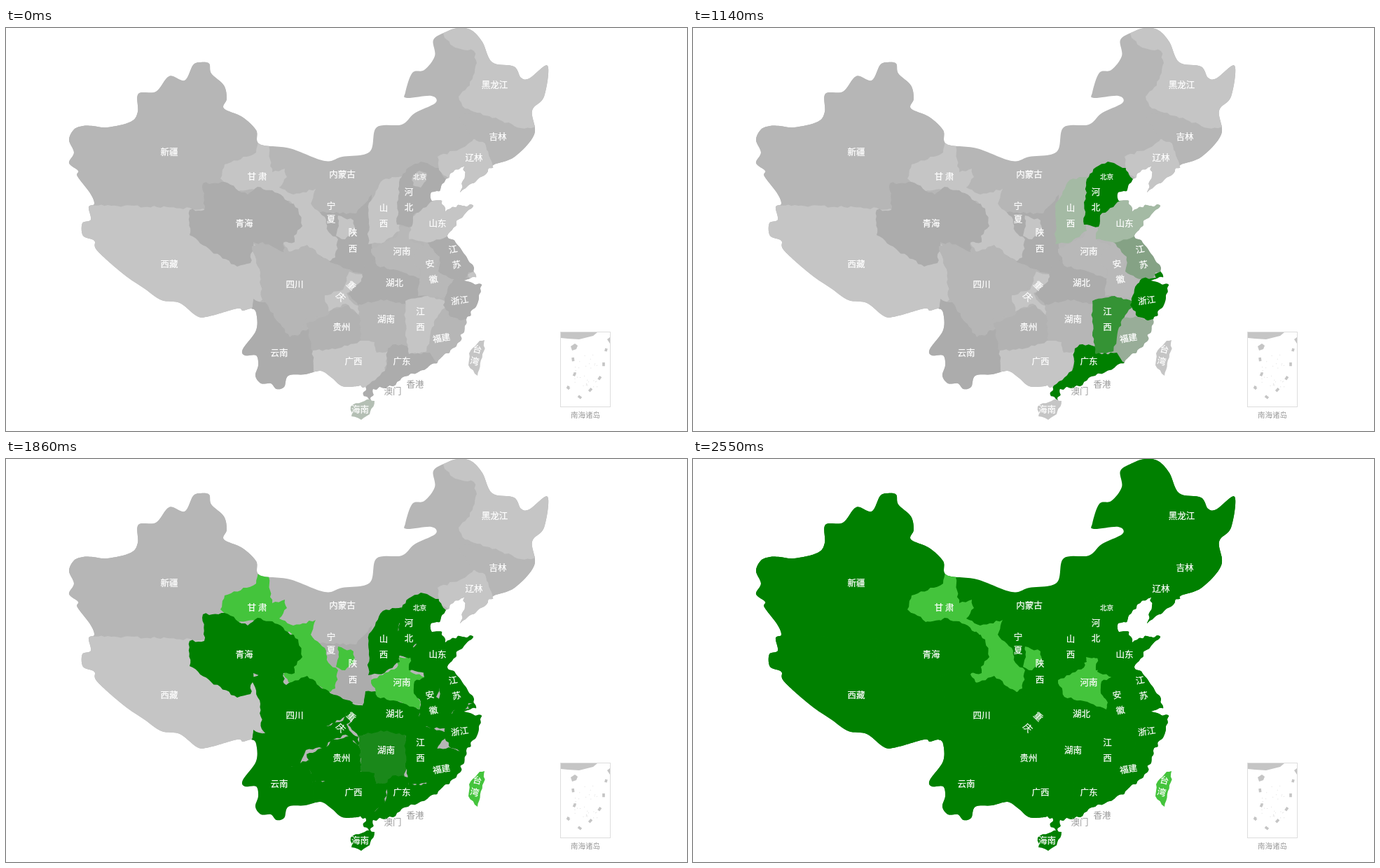
Write an HTML page that moves like this. It is 972 px wide and 576 px high and loops after 7.5 s.

```html
<!DOCTYPE html>
<html lang="zh-CN">
<head>
<meta charset="utf-8">
<style>
html, body { margin: 0; width: 100%; height: 100%; overflow: hidden; background: #fff; }
svg { display: block; width: 972px; height: 576px; }
text { font: 500 12.5px "Noto Sans CJK SC", "Noto Sans CJK", sans-serif; text-anchor: middle; }
#labels { fill: #fff; stroke: #fff; stroke-width: .25px; }
#captions { fill: #999; }
</style>
</head>
<body>
<svg viewBox="0 0 972 576">
  <clipPath id="border"></clipPath>
  <g id="mainland" clip-path="url(#border)"></g>
  <g id="islands"></g>
  <g id="inset" fill="#c5c5c5">
    <rect x="791.5" y="434.5" width="71" height="107" fill="#fff" stroke="#ddd"/>
    <path d="M792 435H844L838 440 818 445 802 444 792 443ZM806 455L812 451 816 454 814 459 808 461ZM858 445L862 442V451Z"/>
    <path d="M809 471L812 494 802 514 822 530 840 511 853 492V473L857 458" fill="none" stroke="#c5c5c5" stroke-width="3.6" pathLength="7.2" stroke-dasharray=".25 .75"/>
  </g>
  <g id="labels"></g>
  <g id="captions"></g>
</svg>
<script>
const LOOP = 7500, STEP = 30, FADE = 240;
const LIGHT = 197, MID = 182, DARK = 172;
const GREEN = [0, 128, 0], BRIGHT = [68, 196, 60];
const provinces = [];

let seed = 7;
const random = () => (seed = seed * 16807 % 2147483647) / 2147483647;
const parse = text => text.split(' ').map(pair => pair.split(',').map(Number));
const mix = (from, to, amount) => from.map((v, i) => v + (to[i] - v) * amount);

function add(parent, tag, attributes) {
  const node = document.createElementNS('http://www.w3.org/2000/svg', tag);
  for (const key in attributes) node.setAttribute(key, attributes[key]);
  return document.getElementById(parent).appendChild(node);
}

// Splits each edge into short pieces and shifts their ends sideways.
function roughen(points, amount) {
  return points.slice(0, -1).flatMap((a, i) => {
    const b = points[i + 1], dx = b[0] - a[0], dy = b[1] - a[1];
    const length = Math.hypot(dx, dy), pieces = Math.ceil(length / 5);
    return Array.from({ length: pieces }, (_, k) => {
      const [x, y] = mix(a, b, k / pieces), shift = k ? (random() * 2 - 1) * amount / length : 0;
      return [x - dy * shift, y + dx * shift];
    });
  });
}

// Closed Catmull-Rom curve through the points.
function curve(p) {
  const n = p.length;
  return 'M' + p[0] + p.map((a, i) => {
    const [b, c, d] = [1, 2, 3].map(k => p[(i + k) % n]);
    const near = b.map((v, k) => v + (c[k] - a[k]) / 6);
    const far = c.map((v, k) => v - (d[k] - b[k]) / 6);
    return i < n - 1 ? `C${near} ${far} ${c}` : `C${near} ${far} ${c}Z`;
  }).join('').replace(/^/, '').replace('M' + p[0], 'M' + p[0]);
}
const closedCurve = p => curve([p[p.length - 1], ...p.slice(0, -1)]).replace(/^M[^C]*/, 'M' + p[0]);

const north = parse('126,251 120,236 102,212 103,204 90,193 97,178 90,160 97,145 110,140 124,140 145,142 178,134 188,120 189,94 214,91 233,69 255,75 267,53 278,49 290,51 293,65 311,82 315,101 311,115 337,127 357,146 362,166 405,172 455,190 480,184 519,177 529,142 565,138 583,122 613,107 607,97 572,100 570,92 580,64 597,60 612,40 610,17 627,6 645,0 664,3 680,20 694,49 725,55 735,71 747,72 773,54 768,98 751,118 754,152 726,184');
const coast = parse('697,195 680,212 648,235 655,210 654,198 638,206 628,216 619,233 607,235 608,247 622,247 627,262 645,253 667,254 647,273 630,297 642,307 668,343 671,356 654,361 679,367 672,396 657,417 648,448 615,479 569,498 552,512 524,516 521,533 511,526 513,513 498,512');
const south = parse('480,512 465,500 449,490 427,495 403,497 397,513 386,516 378,508 364,508 356,497 360,482 357,468 341,468 338,459 357,432 357,407 350,401 338,404 330,401 290,412 273,412 248,393 222,389 197,372 168,352 130,318 126,304 110,297 109,279 121,274 118,256');
add('border', 'path', { d: closedCurve([...north, ...roughen(coast, 2), ...south]) });

function province(grey, start, points, options = {}) {
  const corners = parse(points);
  const d = 'M' + roughen([...corners, corners[0]], 1.6).join('L') + 'Z';
  provinces.push({ grey, start, color: GREEN, ...options, node: add(options.parent || 'mainland', 'path', { d }) });
}

// Painted in order over the northern base; shapes run past the coast and are clipped.
province(MID, 2010, '0,-20 972,-20 972,576 0,576');
province(MID, 1980, '80,40 360,40 362,166 340,200 284,262 230,256 126,251 80,251');
province(LIGHT, 1880, '80,253 150,254 230,256 290,260 356,310 364,350 366,388 357,400 340,430 80,430');
province(DARK, 1880, '448,263 500,265 522,238 522,308 527,332 515,335 510,352 488,346 450,330');
province(LIGHT, 1610, '362,160 373,160 377,188 380,206 398,201 401,213 390,228 410,238 442,230 435,251 455,270 460,291 474,302 470,328 459,333 441,320 407,321 396,308 420,280 408,250 360,230 330,234 306,215 312,195 357,178', { color: BRIGHT });
province(LIGHT, 1610, '474,268 496,275 498,287 484,302 471,297 475,283', { color: BRIGHT });
province(DARK, 1500, '281,222 312,220 345,238 359,227 388,236 417,258 423,283 411,297 412,306 396,306 397,322 366,310 353,306 349,336 330,341 293,319 262,296 262,260 283,260');
province(DARK, 1384, '353,387 375,394 407,440 432,430 437,461 449,480 449,500 400,530 320,510 320,450 350,402');
province(MID, 1290, '351,312 366,306 400,323 430,310 463,335 495,348 484,368 457,382 462,402 457,412 428,416 420,437 405,442 388,420 365,386 363,350');
province(MID - 4, 1470, '464,402 490,396 506,415 507,445 500,455 470,461 437,462 429,422 458,411');
province(DARK, 1600, '509,352 513,332 526,332 553,343 592,358 590,372 602,384 568,396 535,390 503,397 488,380');
province(MID, 1654, '503,395 535,388 570,394 574,420 569,455 545,464 530,465 524,450 507,447');
province(LIGHT, 1600, '490,348 508,352 507,362 486,379 490,388 503,397 503,410 485,394 460,405 455,382 481,374');
province(LIGHT, 1260, '438,461 470,459 510,447 526,449 529,464 545,462 541,490 517,514 500,530 440,510');
province(LIGHT, 965, '570,390 602,383 631,392 615,415 602,462 575,467 570,440');
province(MID + 2, 1610, '561,283 582,285 577,304 598,312 583,332 592,348 590,358 553,345 530,340 521,316 558,298', { color: BRIGHT });
province(MID + 2, 1444, '583,318 597,312 597,302 614,315 619,327 614,340 640,358 628,385 588,383 592,347 582,335');
province(DARK, 1085, '597,301 632,290 690,320 690,350 660,349 655,358 640,359 617,348 619,327');
province(LIGHT, 1100, '588,262 604,240 690,240 690,270 632,296 606,306 575,302 580,270');
province(LIGHT, 1100, '538,217 565,212 560,240 562,290 540,306 517,309 518,250');
province(DARK, 484, '562,216 575,199 592,191 618,200 628,216 630,240 610,247 581,268 579,284 558,281 560,240');
province(LIGHT - 6, 545, '580,213 590,204 600,207 600,218 592,228 581,225');
province(DARK, 720, '634,366 641,358 700,358 700,410 657,420 635,413 624,396');
province(LIGHT, 545, '659,352 680,345 680,358 664,361');
province(MID, 1100, '615,414 632,412 645,417 680,415 650,480 612,485 600,465 608,428');
province(DARK, 200, '545,458 556,452 573,455 575,466 605,464 620,484 560,530 521,545 505,530 515,511 541,490');
province(LIGHT, 2140, '616,184 652,171 668,158 684,165 695,197 710,220 640,250 632,216 618,203');
province(MID, 2048, '642,121 690,122 722,134 770,138 770,170 697,200 684,165 664,156');
province(LIGHT, 1935, '626,14 620,-10 800,-10 800,138 735,143 690,126 655,115 646,98 662,82 672,50 668,33 641,28', { color: BRIGHT, darken: 2310 });
province(LIGHT, 1250, '492,541 515,531 526,533 519,552 507,560 493,555', { parent: 'islands', tint: .085 });
province(LIGHT, 1320, '676,447 683,446 682,462 673,497 660,482 661,465', { parent: 'islands', color: BRIGHT });

function label(text, x, y, angle = 0, size = 12.5, parent = 'labels') {
  add(parent, 'text', { x, y: y + size * .38, transform: `rotate(${angle} ${x} ${y})`, style: `font-size:${size}px` }).textContent = text;
}
function column(text, x, y, dx, dy, angle) {
  [...text].forEach((character, i) => label(character, x + i * dx, y + i * dy, angle));
}
label('新疆', 233, 177);
label('西藏', 233, 337);
label('青海', 340, 279);
label('甘 肃', 358.5, 212);
label('内蒙古', 480, 209);
label('黑龙江', 697.5, 81);
label('吉林', 702, 155);
label('辽林', 668, 185);
label('北京', 590.5, 212.5, 0, 9.5);
label('山东', 616, 279);
label('河南', 565, 319.5);
label('湖北', 554.5, 364.5);
label('四川', 412, 366.5);
label('湖南', 542.5, 416);
label('贵州', 479, 427);
label('云南', 390, 464.5);
label('广西', 496, 476.5);
label('广东', 565, 476.5);
label('海南', 505.5, 545.5);
label('浙江', 647.5, 389, -8);
label('福建', 621.5, 443, -10);
column('河北', 575, 234, 0, 22.5);
column('山西', 539, 257, 0, 22);
column('宁夏', 464, 254, 0, 19);
column('陕西', 495, 292.5, 0, 22.5);
column('江西', 591.5, 405, 0, 22);
column('江苏', 638, 316, 5, 22, -10);
column('安徽', 605, 337, 5, 22, -10);
column('重庆', 493, 368, -15, 16, 45);
column('台湾', 673, 459, -4, 17, 13);
label('香港', 584, 509.5, 0, 12.5, 'captions');
label('澳门', 552, 519, 0, 12.5, 'captions');
label('南海诸岛', 827, 553, 0, 10.5, 'captions');

for (let i = 0; i < 30; i++)
  add('inset', 'circle', { cx: 812 + random() * 33, cy: 466 + random() * 48, r: .5, opacity: .7 });

const progress = (time, start) => Math.min(1, Math.max(0, (time - start) / FADE));

function draw(now) {
  const elapsed = now % LOOP, time = elapsed - elapsed % STEP;
  for (const { grey, start, color, darken = Infinity, tint = 0, node } of provinces) {
    const leftover = tint * Math.max(0, 1 - time / 1140);
    let shade = mix([grey, grey, grey], GREEN, leftover);
    shade = mix(shade, color, progress(time, start));
    shade = mix(shade, GREEN, progress(time, darken));
    node.setAttribute('fill', `rgb(${shade.map(Math.round)})`);
  }
}

const began = performance.now();
function tick() {
  draw(performance.now() - began);
  requestAnimationFrame(tick);
}
tick();
</script>
</body>
</html>
```
